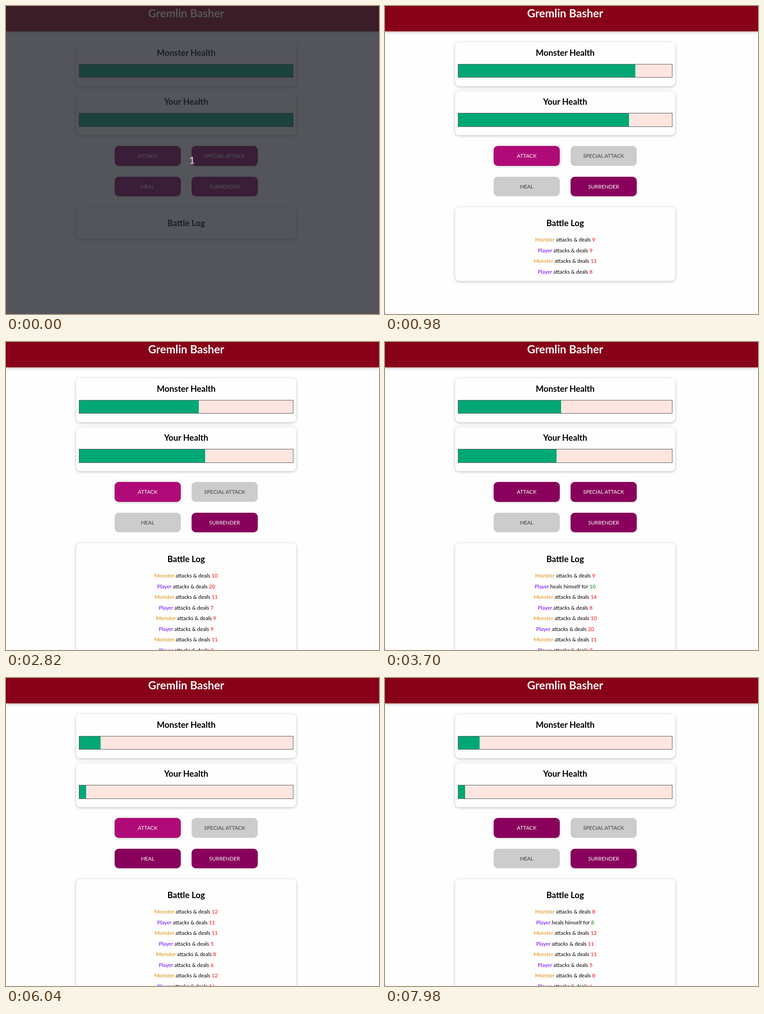
An HTML page that plays this animation: 824 by 680 pixels, repeating every 8000 ms.

```html
<!DOCTYPE html>
<html lang="en">
<head>
<meta charset="utf-8">
<title>Gremlin Basher</title>
<style>
  * { box-sizing: border-box; }
  html, body { margin: 0; width: 100%; height: 100%; overflow: hidden; }
  body { position: relative; background: #fefefe; color: #000; font: 11.7px Lato, "Open Sans", sans-serif; }
  #stage { position: absolute; left: 0; top: 0; width: 824px; height: 680px; overflow: hidden; }
  #stage > * { position: absolute; }
  h1, h2 { margin: 0; text-align: center; white-space: nowrap; }
  header { left: 0; top: 0; width: 824px; height: 56px; background: #880017; box-shadow: 0 1.5px 6px rgba(0,0,0,.26); }
  h1 { position: absolute; left: 0; top: -3px; width: 796px; font-size: 24.6px; line-height: 38px; color: #fefefe; }
  .card { left: 155.375px; width: 485.2px; height: 96.6px; border-radius: 9px; box-shadow: 0 1.5px 6px rgba(0,0,0,.26); }
  .card > * { position: absolute; }
  h2 { left: 0; width: 100%; top: 8px; font-size: 18.6px; line-height: 30px; }
  .bar { left: 6px; top: 48px; width: 473.2px; height: 30.3px; border: 1px solid #575757; background: #fde5e0; }
  .bar i { display: block; height: 100%; background: #00a876; }
  .btn { width: 145.6px; height: 43.2px; border-radius: 9px; background: #88005b; color: #fefefe;
    line-height: 42px; text-align: center; box-shadow: .75px .75px 3px rgba(0,0,0,.26); }
  .btn.hover { background: #af0a78; box-shadow: .75px .75px 6px rgba(0,0,0,.26); }
  .btn.off { background: #ccc; color: #3f3f3f; box-shadow: none; }
  #log h2 { top: 20px; }
  #rows { left: 0; top: 60px; width: 100%; text-align: center; line-height: 23.5px; white-space: nowrap; }
  .player { color: #7700ff; }
  .monster { color: #da8d00; }
  .deals { color: red; }
  .heals { color: green; }
  #dim { inset: 0; background: rgba(36,38,44,.78); }
  #dim b { position: absolute; left: 401px; top: 326px; width: 20px; font: 22px/28px Lato, sans-serif; text-align: center; color: #f3e6f1; }
</style>
</head>
<body>
<div id="stage">
  <header><h1>Gremlin Basher</h1></header>
  <section class="card" style="top:80px"><h2>Monster Health</h2><div class="bar"><i id="foe"></i></div></section>
  <section class="card" style="top:188.4px"><h2>Your Health</h2><div class="bar"><i id="you"></i></div></section>
  <div class="btn" style="left:240.2px;top:309.4px">ATTACK</div>
  <div class="btn" style="left:410.2px;top:309.4px">SPECIAL ATTACK</div>
  <div class="btn" style="left:240.2px;top:376.8px">HEAL</div>
  <div class="btn" style="left:410.2px;top:376.8px">SURRENDER</div>
  <section class="card" id="log" style="top:444px"><h2>Battle Log</h2><div id="rows"></div></section>
  <div id="dim"><b>1</b></div>
</div>
<script>
const LOOP = 8000, CLEAR = 20;

// time, player's points, monster's points, player heals
const ROUNDS = [
  [560, 8, 11], [980, 9, 9], [1580, 7, 11], [2260, 20, 10],
  [3180, 8, 14], [3700, 10, 9, true], [4640, 16, 12], [5260, 6, 8],
  [5640, 5, 11], [6040, 11, 12], [7080, 8, 8, true]
];

// time, index of the button under the pointer (-1: none)
const HOVERS = [
  [0, -1], [20, 0], [1940, -1], [1960, 1], [2260, -1], [2820, 0],
  [3380, -1], [3440, 2], [3700, -1], [4420, 1], [4640, -1], [4940, 0],
  [6340, -1], [6360, 2], [7080, -1], [7700, 3], [7980, -1]
];

const $ = id => document.getElementById(id);
const buttons = [...document.querySelectorAll('.btn')];

const row = (who, points, heals) =>
  `<div><span class="${who.toLowerCase()}">${who}</span> ` +
  (heals ? 'heals himself for' : 'attacks &amp; deals') +
  ` <span class="${heals ? 'heals' : 'deals'}">${points}</span></div>`;

function render(t) {
  const done = ROUNDS.filter(r => r[0] <= t);
  const hover = HOVERS.filter(h => h[0] <= t).pop()[1];
  const n = done.length;
  let foe = 100, you = 100, rows = '';
  for (const [, p, m, heals] of done) {
    if (heals) you = Math.min(100, you + p);
    else foe -= p;
    you -= m;
    rows = row('Monster', m) + row('Player', p, heals) + rows;
  }
  $('foe').style.width = foe + '%';
  $('you').style.width = you + '%';
  $('rows').innerHTML = rows;
  $('log').style.height = 69.6 + 46.8 * n + 'px';
  $('dim').hidden = t >= CLEAR;

  // special attack returns every third round, healing every fifth
  const off = [false, n % 3 > 0, n % 5 > 0, false];
  buttons.forEach((b, i) => {
    b.classList.toggle('off', off[i]);
    b.classList.toggle('hover', i === hover && !off[i]);
  });
}

const steps = [...new Set([0, CLEAR, ...ROUNDS.map(r => r[0]), ...HOVERS.map(h => h[0])])].sort((a, b) => a - b);
const start = performance.now();
let shown = -1;

function tick() {
  const t = (performance.now() - start) % LOOP;
  const step = steps.filter(s => s <= t).pop();
  if (step !== shown) render(shown = step);
  requestAnimationFrame(tick);
}
tick();
</script>
</body>
</html>
```
